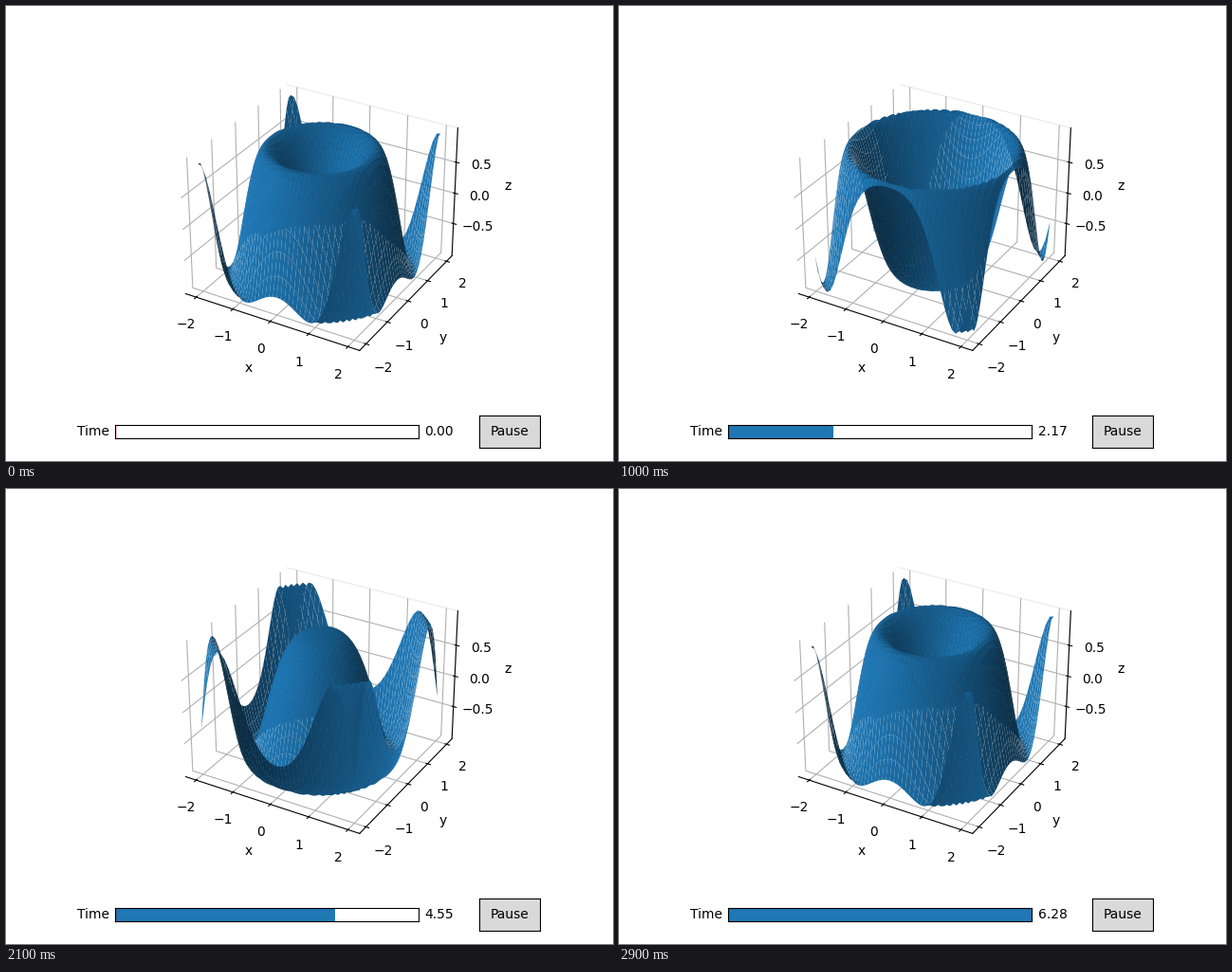
Animation of 640 by 480 pixels, one loop 3000 ms. Source, as a matplotlib script:

```python
import numpy as np
import matplotlib.pyplot as plt
from matplotlib.animation import FuncAnimation
from matplotlib.patches import Rectangle

BLUE = "#1f77b4"
FRAMES, INTERVAL = 30, 100
PAD = 25 / 24  # box is slightly larger than the data limits

plt.rcParams["font.family"] = "DejaVu Sans"

times = np.linspace(0, 2 * np.pi, FRAMES)
side = np.linspace(-2, 2, 41)
X, Y = np.meshgrid(side, side)
R2 = X**2 + Y**2

fig = plt.figure(figsize=(6.4, 4.8), dpi=100, facecolor="white")
fig.subplots_adjust(bottom=0.2)


def setup_surface_axes():
    ax = fig.add_subplot(projection="3d")
    ax.view_init(elev=30, azim=-60)
    ax.set(xlabel="x", ylabel="y", zlabel="z")
    ax.set_xlim(-2.2 * PAD, 2.2 * PAD)
    ax.set_ylim(-2.2 * PAD, 2.2 * PAD)
    ax.set_zlim(-PAD, PAD)
    ax.set_xticks(range(-2, 3))
    ax.set_yticks(range(-2, 3))
    ax.set_zticks([-0.5, 0, 0.5])
    for axis in (ax.xaxis, ax.yaxis, ax.zaxis):
        axis.set_pane_color((1, 1, 1, 1))
    ax.yaxis.pane.set_edgecolor("0.93")
    return ax


def control_axes(rect, color):
    ax = fig.add_axes(rect, facecolor=color)
    ax.set(xticks=[], yticks=[], xlim=(0, 1), ylim=(0, 1))
    return ax


ax = setup_surface_axes()

slider = control_axes([0.18, 0.05, 0.5, 0.03], "white")
bar = slider.add_patch(Rectangle((0, 0), 0, 1, facecolor=BLUE, edgecolor="none"))
slider.axvline(0, color="red", lw=1)
slider.text(-0.02, 0.5, "Time", ha="right", va="center")
value = slider.text(1.02, 0.5, "", ha="left", va="center")

button = control_axes([0.78, 0.03, 0.1, 0.07], "0.85")
button.text(0.5, 0.5, "Pause", ha="center", va="center")

surface = None


def update(i):
    global surface
    if surface is not None:
        surface.remove()
    t = times[i]
    surface = ax.plot_surface(X, Y, np.sin(R2 - t), color=BLUE)
    bar.set_width(t / times[-1])
    value.set_text(f"{t:.2f}")
    return surface, bar, value


anim = FuncAnimation(fig, update, frames=FRAMES, interval=INTERVAL,
                     repeat=True, repeat_delay=0, blit=False)
plt.show()
```
